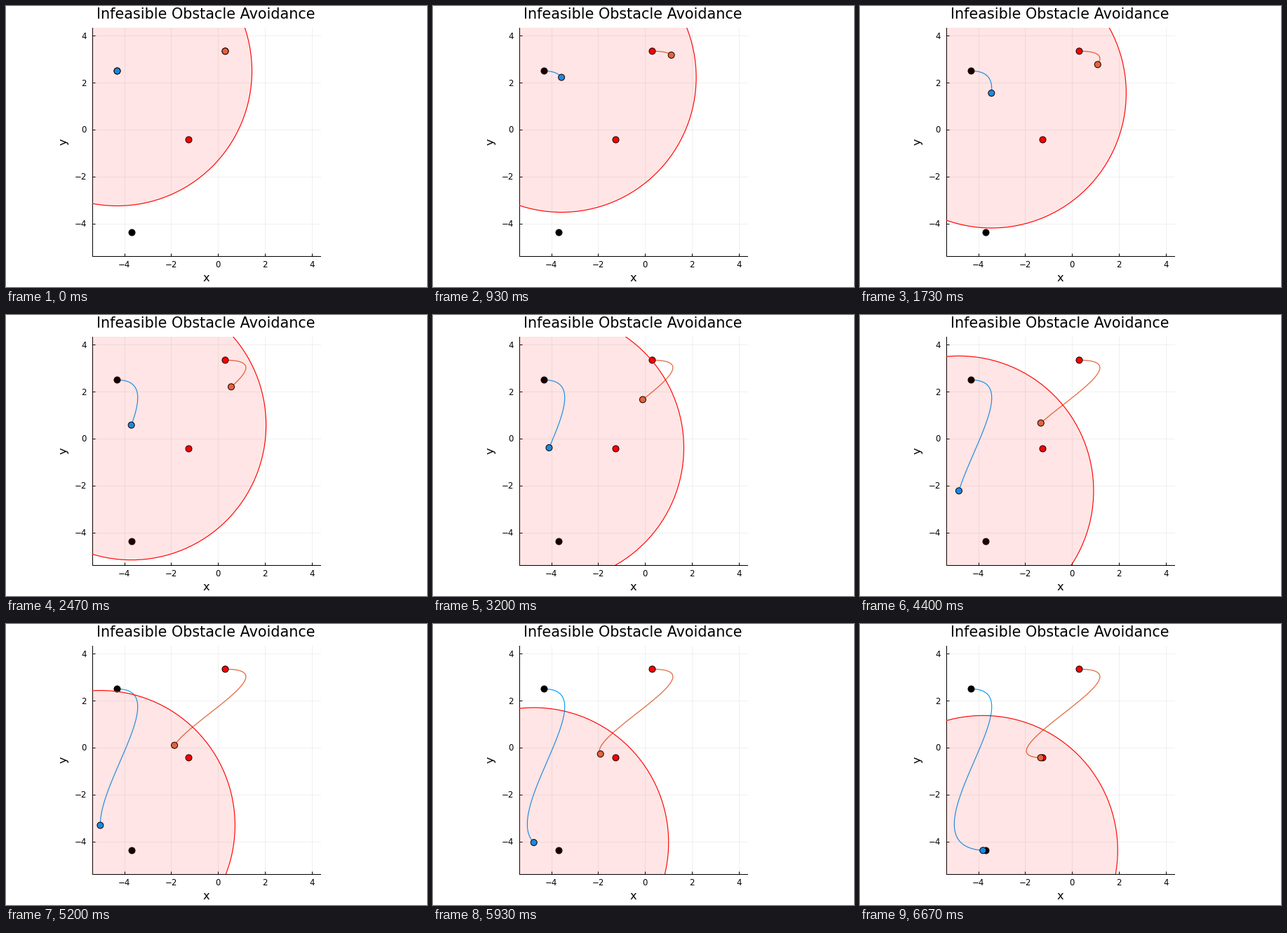
Recreate the animation shown at these times as a matplotlib script. Size 600 by 400 pixels, loop 6.74 s.

```python
import numpy as np
import matplotlib.pyplot as plt
from matplotlib.animation import FuncAnimation
from matplotlib.patches import Circle, Rectangle

W, H, DPI = 600, 400, 100
STEPS = 101
LOOP_MS = 6740
PX = 72 / DPI                      # points per pixel
LEFT, TOP, RIGHT, BOTTOM = 122.5, 30.5, 447.5, 355.5
X0, Y0, UNIT = 302.2, 176.0, 33.42  # data origin and scale on the stage
BLUE, ORANGE = "#009AFA", "#E26F46"
REACH = 192                        # radius of the avoidance disc


def blend(s, a, b, m0=0, m1=0, bump=0):
    """Cubic Hermite from a to b with end slopes and a mid-path bump."""
    ease = s * s * (3 - 2 * s)
    return (a + (b - a) * ease + m0 * s * (1 - s) ** 2
            - m1 * s * s * (1 - s) + bump * (s * (1 - s)) ** 2)


s = np.linspace(0, 1, STEPS)
blue_path = np.column_stack([
    blend(s, 158.5, 179.5, 282, 436, 181),
    blend(s, 92.5, 322.5, 0, 11.5, -110)])
orange_path = np.column_stack([
    blend(s, 312.5, 260.5, 346, 304),
    blend(s, 64.3, 190.4, 0, 1.9, -16.4)])

fig = plt.figure(figsize=(W / DPI, H / DPI), dpi=DPI, facecolor="white")
ax = fig.add_axes([0, 0, 1, 1])
ax.set_xlim(0, W)
ax.set_ylim(H, 0)
ax.axis("off")
plt.rcParams["font.family"] = "DejaVu Sans"


def line(xs, ys, color="black", width=1.0, **kw):
    return ax.plot(xs, ys, color=color, lw=width * PX, **kw)[0]


def label(x, y, text, size, **kw):
    kw = {"ha": "center", "va": "baseline", **kw}
    ax.text(x, y, text, fontsize=size * PX, **kw)


def dot(pos, color, z):
    return ax.add_patch(Circle(pos, 4.5, fc=color, ec="black", lw=PX, zorder=z))


# Grid, ticks and tick labels
for v in range(-4, 5, 2):
    x, y = X0 + v * UNIT, Y0 - v * UNIT
    text = str(v).replace("-", "\u2212")
    line([x, x], [TOP, BOTTOM], alpha=0.06, zorder=1)
    line([LEFT, RIGHT], [y, y], alpha=0.06, zorder=1)
    line([x, x], [BOTTOM, BOTTOM - 4], zorder=2, solid_capstyle="butt")
    line([LEFT, LEFT + 4], [y, y], zorder=2, solid_capstyle="butt")
    label(x, 371.5, text, 11.8)
    label(115, y + 4.4, text, 11.8, ha="right")

line([LEFT, LEFT, RIGHT], [TOP, BOTTOM, BOTTOM], zorder=2)
label(284.5, 18.3, "Infeasible Obstacle Avoidance", 20.75)
label(285, 391.5, "x", 16.3)
label(82, 193, "y", 16.3, rotation=90, va="center")

# Start and goal marks
for path, color in ((blue_path, "black"), (orange_path, "red")):
    for end in (path[0], path[-1]):
        dot(end, color, 4)

blue_trail = line([], [], BLUE, 1.15, zorder=3)
orange_trail = line([], [], ORANGE, 1.3, zorder=3)
blue_dot = dot(blue_path[0], BLUE, 5)
orange_dot = dot(orange_path[0], ORANGE, 5)

window = Rectangle((LEFT, TOP), RIGHT - LEFT, BOTTOM - TOP,
                   transform=ax.transData)
disc = ax.add_patch(Circle(blue_path[0], REACH, fc=(1, 0, 0, 0.1),
                           ec="red", lw=1.15 * PX, zorder=6))
disc.set_clip_path(window)

movers = ((blue_path, blue_trail, blue_dot),
          (orange_path, orange_trail, orange_dot))


def update(k):
    for path, trail, mark in movers:
        trail.set_data(path[:k + 1, 0], path[:k + 1, 1])
        mark.center = path[k]
    disc.center = blue_path[k]
    return blue_trail, orange_trail, blue_dot, orange_dot, disc


anim = FuncAnimation(fig, update, frames=STEPS, interval=LOOP_MS / STEPS,
                     repeat=True, repeat_delay=0, blit=False)
plt.show()
```
